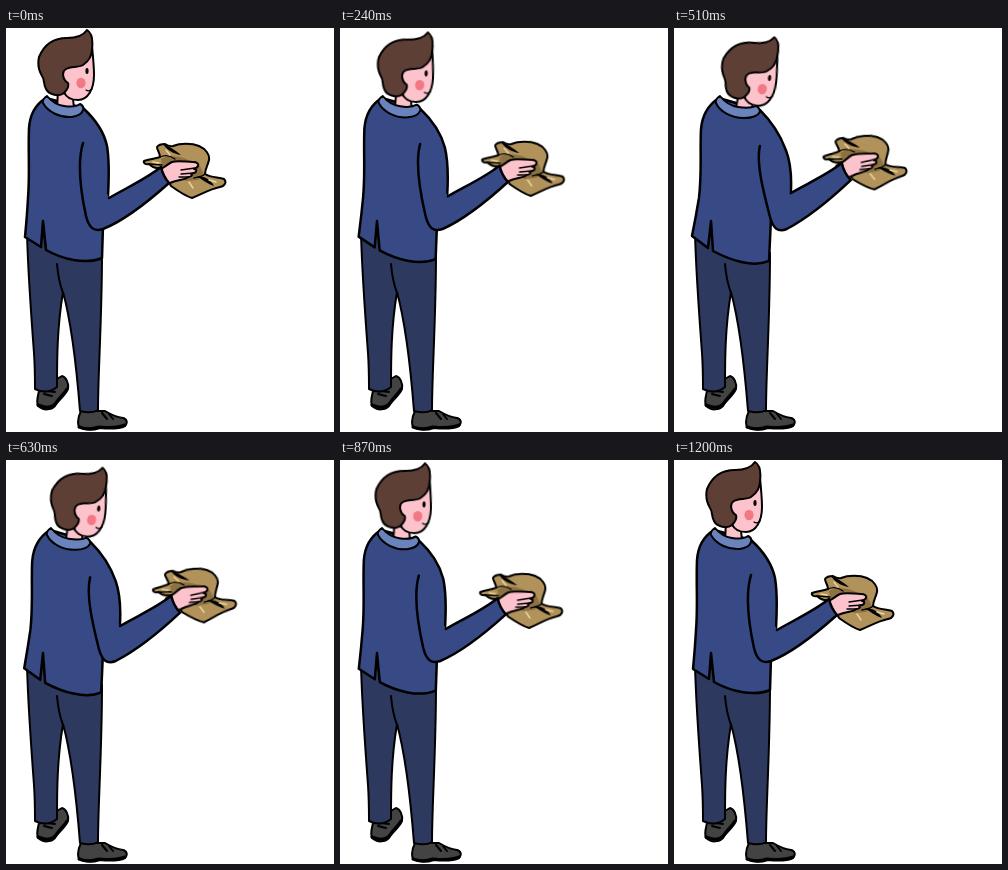
These frames come from a looping animation (328x404 px, 1290 ms). An HTML page:

```html
<!DOCTYPE html>
<html lang="en">
<head>
<meta charset="utf-8">
<title>Man holding a hat</title>
<style>
html, body { margin: 0; width: 100%; height: 100%; overflow: hidden; background: #fff; }
svg { display: block; width: 328px; height: 404px; }
path { stroke: #000; stroke-width: 2; stroke-linejoin: round; stroke-linecap: round; }
.line { fill: none; }
.sole { fill: none; stroke-width: 3; }
.thin { fill: none; stroke-width: 1.3; }
.glint { fill: none; stroke: #ecd5a0; stroke-width: 1.4; }
.ink { stroke: none; fill: #000; }
.pants { fill: #2e395f; }
.shoe { fill: #434343; }
.cloth { fill: #374a85; stroke-width: 2.5; }
.collar { fill: #6b83bd; }
.skin { fill: #fdc3cd; }
.hair { fill: #5e3f35; }
.felt { fill: #b0925a; }
.shade { fill: #8c7142; stroke: none; }

/* --a is the upright pose, --b the leaning one */
.morph, .move, .lift {
  animation: 1290ms cubic-bezier(.45, 0, .62, 1) infinite;
}
.morph { animation-name: morph; }
.move { animation-name: move; }
.lift {
  animation-name: lift;
  animation-timing-function: cubic-bezier(.8, 0, .8, 1);
}
@keyframes morph {
  0%, 82.56%, 100% { d: var(--a); }
  43.02% { d: var(--b); animation-timing-function: cubic-bezier(.04, 0, .58, 1); }
}
@keyframes move {
  0%, 82.56%, 100% { transform: var(--a); }
  43.02% { transform: var(--b); animation-timing-function: cubic-bezier(.04, 0, .58, 1); }
}
@keyframes lift {
  0%, 82.56%, 100% { transform: var(--a); }
  43.02% { transform: var(--b); animation-timing-function: cubic-bezier(.35, 0, .55, 1); }
}

#torso {
  --a: path("M40 70C30 76 24 86 23 100C22 125 24 145 22 170C21 188 20 198 19 209L35 219L37 193L40 222C56 231 79 237 96 230L97 198L102 168C103 150 103 130 101 118C98 104 88 90 77 80Z");
  --b: path("M45 70C34 77 28 88 27 102C26 125 28 145 25 170C22 188 20 198 18 208L34 220L37 193L39 223C56 232 79 240 95 233L97 190L117 165C118 150 117 135 112 122C106 106 96 92 86 82Z");
}
#sleeve {
  --a: path("M77 115C71 135 75 165 80 188C83 200 88 204 97 201C120 192 144 172 163 155Q157 148 155 139C140 151 120 160 103 170");
  --b: path("M86 118C82 135 90 165 96 188C99 200 104 205 113 201C137 188 158 170 177 152Q170 145 168 135C153 147 134 155 117 165");
}
#collar {
  --a: path("M41 68C38 70 36 72 37 75C42 84 54 90 66 89C72 88 76 86 77 82C78 79 76 77 74 76C70 79 64 79 58 78C51 77 45 73 41 68Z");
  --b: path("M46 68C43 70 41 72 42 75C46 84 58 90 70 90C78 90 84 88 86 84C86 81 84 79 82 78C76 81 70 80 64 79C57 78 50 73 46 68Z");
}
.head {
  --a: translate(0px, 0px) rotate(0deg);
  --b: translate(11.5px, 4.6px) rotate(6.8deg);
  transform-origin: 62px 72px;
}
#reach {
  --a: translate(0px, 0px);
  --b: translate(13px, -4.5px);
}
#wrist {
  --a: translate(0px, 0px) rotate(0deg);
  --b: translate(0px, -2px) rotate(-5deg);
  transform-origin: 160px 148px;
}
</style>
</head>
<body>
<svg viewBox="0 0 328 404">
  <g id="legs">
    <path class="shoe" d="M33 363C32 368 30 373 32 378C38 383 45 382 49 378C53 371 60 367 62 361C63 355 60 349 56 348L49 352Z"/>
    <path class="sole" d="M32 377C39 380 45 380 49 376C53 370 58 366 61 361"/>
    <path class="line" d="M38 366L46 368M41 363L49 364"/>
    <path class="shoe" d="M75 383C72 389 71 394 73 399C80 403 88 402 94 400C104 401 113 401 119 398C122 395 121 391 117 390C109 389 104 386 99 383Z"/>
    <path class="sole" d="M73 399C80 402 87 401 93 399C103 400 112 400 119 397"/>
    <path class="line" d="M96 385L101 391M103 386L107 391"/>
    <path class="pants" d="M21 205C22 245 25 285 28 325C29 340 29 352 29 361C37 365 45 364 51 359C51 332 51 300 57 264C66 297 71 345 74 383C81 385 87 385 92 382C92 345 96 290 96 225L70 215Z"/>
    <path class="line" d="M51 236C52 248 54 257 57 265"/>
  </g>

  <path id="torso" class="cloth morph"/>

  <g class="head move">
    <path class="skin" d="M52 62L51 81H68L67 70Z"/>
  </g>
  <path id="collar" class="collar morph"/>
  <g class="head move">
    <path class="skin" d="M86 18C87 28 88 38 88 47C88 61 82 72 72 72C65 72 60 69 58 64L55 42Z"/>
    <path class="hair" d="M86 21C87 13 86 5 81 2C77 8 70 10 61 10C48 10 38 17 33 29C31 38 33 43 36 48C39 52 37 56 40 61C43 67 53 69 58 65C61 62 63 58 62 55C57 52 55 44 60 41C65 38 72 40 77 37C83 33 86 28 86 21Z"/>
    <ellipse cx="75" cy="55" rx="4.6" ry="5.2" fill="#f27884"/>
    <ellipse cx="81" cy="43" rx="1.6" ry="3"/>
    <path class="thin" d="M80 62Q83 64 86 61"/>
  </g>

  <g id="reach" class="move">
    <g id="wrist" class="lift">
      <path class="felt" d="M138 133C143 131 148 131 154 129C154 125 151 122 151 119C153 116 156 116 159 116C162 118 164 119 167 118C174 115 186 115 193 118C200 121 204 127 203 132C202 137 199 141 199 146C205 150 212 149 218 151C221 154 219 158 214 159C204 161 196 166 186 170C179 168 172 163 165 158L156 140C150 141 145 138 143 136C140 137 137 135 138 133Z"/>
      <path class="shade" d="M155 131C162 127 172 128 180 131L194 138L198 147L192 152L180 153L157 141Z"/>
      <path class="ink" d="M157 116C163 118 169 122 175 127C167 126 160 121 157 116ZM191 148C199 148 205 152 208 158C202 156 196 152 191 148Z"/>
      <path class="thin" d="M154 129C160 126 165 128 169 131M199 146C196 149 192 149 188 150M143 136L156 137"/>
      <path class="glint" d="M160 122L164 127M147 134L153 135M183 154L187 160M203 152L210 154"/>
      <path class="skin" d="M150 143C157 141 160 137 166 134C172 132 180 134 187 134C191 134 193 136 192 138C191 140 190 140 188 141C191 141 191 144 188 145L185 146C187 147 185 149 182 149C180 152 172 151 164 155L154 158Z"/>
      <path class="thin" d="M189 140L175 142M188 145L175 146M182 149L173 149"/>
    </g>
  </g>

  <path id="sleeve" class="cloth morph"/>
</svg>
</body>
</html>
```
